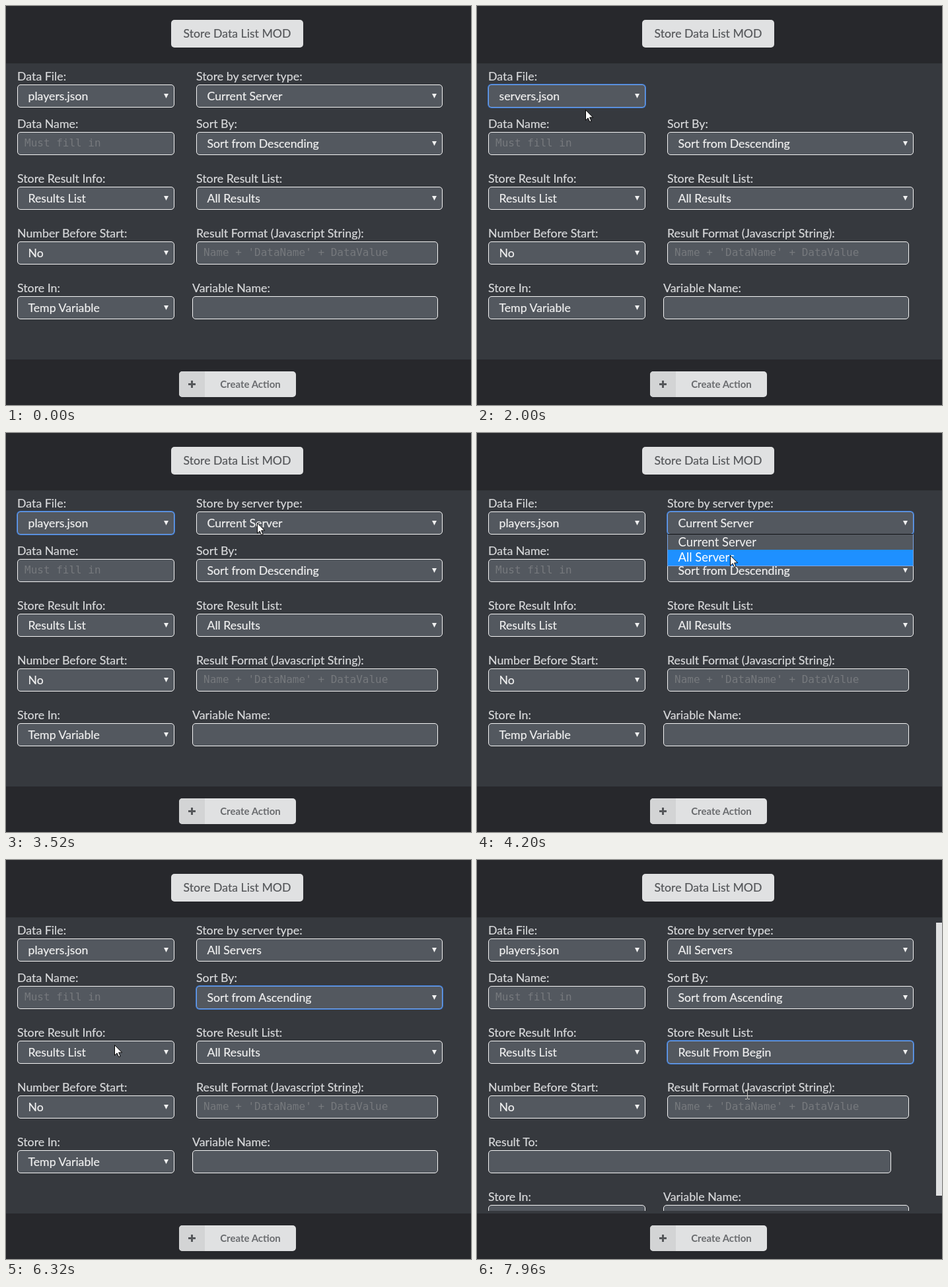
These frames come from a looping animation (704 px wide and 605 px high, 8 s). An HTML page:

```html
<!DOCTYPE html>
<html lang="en">
<head>
<meta charset="utf-8">
<title>Store Data List</title>
<style>
  html, body { margin: 0; width: 100%; height: 100%; overflow: hidden; background: #36393e; }
  #stage { position: absolute; left: 0; top: 0; width: 704px; height: 605px; overflow: hidden;
    background: #36393e; font: 17.8px Lato, sans-serif; color: #d8d9db; -webkit-text-stroke: .2px; }
  #stage div, #stage svg { position: absolute; box-sizing: border-box; white-space: pre; }
  .bar { left: 0; width: 704px; background: #27282c; }
  #form { left: 0; top: 0; width: 704px; height: 532px; overflow: hidden; }
  .label { line-height: 24px; }
  .box { height: 35px; line-height: 33px; border: 1px solid #f4f4f4; border-radius: 5px; background: #53585f; }
  .select { padding-left: 15.5px; font-size: 17.7px; color: #f0f0f0; }
  .select::after { content: ""; position: absolute; right: 8px; top: 13px; width: 7px; height: 7px;
    background: #f0f0f0; clip-path: polygon(0 0, 100% 0, 50% 100%); }
  .input { padding-left: 10px; line-height: 31px; font-family: "DejaVu Sans Mono", monospace; font-size: 16px;
    color: #76797d; -webkit-text-stroke: 0; }
  .focus { border-color: #6ea2ee; box-shadow: 0 0 0 1px #4079cb; }
  .button { background: #e0e1e2; color: #55575a; border-radius: 5px; overflow: hidden; text-align: center; }
  #popup { border: 1px solid #7aa5e8; border-top-color: #101114; background: #53585f; color: #f4f4f4;
    font-size: 18.4px; -webkit-text-stroke: 0; }
  #popup div { left: 0; right: 0; height: 24px; line-height: 23px; padding-left: 15.5px; }
  #popup .on { background: #1e90ff; color: #fff; }
  #popup.blank { background: #fff; border-color: #fff; }
  #popup.blank div { display: none; }
  #thumb { left: 695px; top: 95px; width: 9px; height: 414px; background: #e0e1e2; }
</style>
</head>
<body>
<div id="stage">
  <div id="form"></div>
  <div class="bar" style="top:0;height:87px"></div>
  <div class="bar" style="top:536px;height:69px"></div>
  <div class="button" style="left:250px;top:21px;width:200px;height:42px;font-size:17.7px;line-height:42px">Store Data List MOD</div>
  <div class="button" style="left:262px;top:554px;width:177px;height:39px">
    <div style="left:0;top:0;width:39px;height:39px;background:#d3d4d5"></div>
    <svg width="39" height="39" style="left:0;top:0"><path d="M14 19.5h11M19.5 14v11" stroke="#55575a" stroke-width="3"/></svg>
    <div style="left:39px;top:0;width:138px;font:700 15px/39px Lato,sans-serif;color:#6a6c6f;-webkit-text-stroke:0">Create Action</div>
  </div>
  <div id="thumb"></div>
  <div id="popup"></div>
  <svg id="arrow" width="14" height="21" style="left:0;top:0">
    <path d="M.5 .7V16.2L4.1 12.8L6.7 18.6L9.1 17.5L6.6 11.9H11.6Z" fill="#fff" stroke="#000"/>
  </svg>
  <svg id="beam" width="9" height="17" style="left:0;top:0">
    <path d="M1 1.5H3.5L4.5 2.5L5.5 1.5H8M4.5 2V15M1 15.5H3.5L4.5 14.5L5.5 15.5H8" fill="none" stroke="#c8c6c1"/>
  </svg>
</div>
<script>
const $ = id => document.getElementById(id);
const form = $("form"), popup = $("popup");
const ROW = 83, ITEM = 23.5, STEP = 40, LOOP = 8000;

function add(parent, cls, text, x, y, w) {
  const el = document.createElement("div");
  el.className = cls;
  el.textContent = text;
  el.style.cssText = `left:${x}px;top:${y}px;` + (w ? `width:${w}px` : "");
  parent.append(el);
  return el;
}

function field(kind, row, label, options, x, w) {
  const y = row ? 108 + ROW * row : 119;
  const parts = [add(form, "label", label, x, y - 25), add(form, "box " + kind, options[0], x, y, w)];
  const style = (key, value) => parts.forEach(p => p.style[key] = value);
  return { x, y, w, options, style, box: parts[1] };
}

const left = (row, label, ...options) => field("select", row, label, options, 17, 238);
const right = (row, label, ...options) => field("select", row, label, options, 288, 373);
const input = (row, label, hint, x, w) => field("input", row, label, [hint], x, w);

const file = left(0, "Data File:", "players.json", "servers.json");
const server = right(0, "Store by server type:", "Current Server", "All Servers");
input(1, "Data Name:", "Must fill in", 17, 238);
const sort = right(1, "Sort By:", "Sort from Descending", "Sort from Ascending");
left(2, "Store Result Info:", "Results List");
const list = right(2, "Store Result List:", "All Results", "Result From Begin", "Result From End", "Result To End");
left(3, "Number Before Start:", "No");
input(3, "Result Format (Javascript String):", "Name + 'DataName' + DataValue", 288, 366);
const resultTo = input(4, "Result To:", "", 17, 610);
const moved = [left(4, "Store In:", "Temp Variable"), input(4, "Variable Name:", "", 282, 372)];

// Each visit opens a menu and picks one row, with the pointer at x
const visits = [
  { f: file, open: 1080, pick: 1800, row: 1, x: 154 },
  { f: file, open: 2320, pick: 2960, row: 0, x: 172 },
  { f: server, open: 3720, pick: 4440, row: 1, x: 383 },
  { f: sort, open: 5160, pick: 5800, row: 1, x: 369 },
  { f: list, open: 7000, pick: 7840, row: 1, x: 392 }
];

const smooth = u => u * u * (3 - 2 * u);
const settle = u => 1 - (1 - u) ** 5;
const menuTop = f => f.y + 34;

// Pointer legs: travel to a field, then drop onto the chosen row
const legs = [];
const go = (from, to, x, y, ease = smooth) => legs.push({ from, to, x, y, ease });
let free = 320;
for (const { f, open, pick, row, x } of visits) {
  if (f === list) go(free, free = 6320, 164, 280);
  go(Math.max(free, open - 760), open - 160, x, f.y + 17);
  go(pick - 600, pick - 160, x, menuTop(f) + ITEM * row + 9, settle);
  free = pick;
}
go(free, LOOP - STEP, 409, 355);

function pointer(t) {
  let x = 300, y = 600;
  for (const leg of legs) {
    const e = leg.ease(Math.min(1, Math.max(0, (t - leg.from) / (leg.to - leg.from))));
    x += (leg.x - x) * e;
    y += (leg.y - y) * e;
  }
  return [Math.round(x), Math.round(y)];
}

function drawMenu(t) {
  const visit = visits.find(v => t >= v.open && t < v.pick);
  popup.style.display = visit ? "" : "none";
  if (!visit) return;
  const { f, open } = visit, top = menuTop(f);
  const under = Math.floor((pointer(t - STEP)[1] - top) / ITEM);
  const on = under < 0 ? f.value : under;
  popup.style.cssText = `left:${f.x}px;top:${top}px;width:${f.w}px;height:${f.options.length * ITEM + 2}px`;
  popup.className = t < open + 2 * STEP ? "blank" : "";
  popup.textContent = "";
  f.options.forEach((o, i) => add(popup, i === on ? "on" : "", o, 0, Math.floor(i * ITEM)));
}

function render(t) {
  const focused = visits.filter(v => v.open <= t).pop();
  for (const f of [file, server, sort, list]) {
    const picked = visits.filter(v => v.f === f && v.pick <= t).pop();
    f.value = picked ? picked.row : 0;
    f.box.textContent = f.options[f.value];
    f.box.classList.toggle("focus", !!focused && focused.f === f);
  }
  const extra = list.value > 0;
  server.style("visibility", file.value ? "hidden" : "");
  resultTo.style("visibility", extra ? "" : "hidden");
  moved.forEach(f => f.style("transform", `translateY(${extra ? ROW : 0}px)`));
  $("thumb").style.display = extra ? "" : "none";
  drawMenu(t);

  const [x, y] = pointer(t);
  $("arrow").style.display = t >= 320 && !extra ? "" : "none";
  $("beam").style.display = extra ? "" : "none";
  $("arrow").style.transform = `translate(${x}px,${y}px)`;
  $("beam").style.transform = `translate(${x - 4}px,${y - 8}px)`;
}

let start, shown = -1;
function tick(now) {
  start ??= now;
  const t = Math.floor((now - start) % LOOP / STEP) * STEP;
  if (t !== shown) render(shown = t);
  requestAnimationFrame(tick);
}
render(0);
requestAnimationFrame(tick);
</script>
</body>
</html>
```
